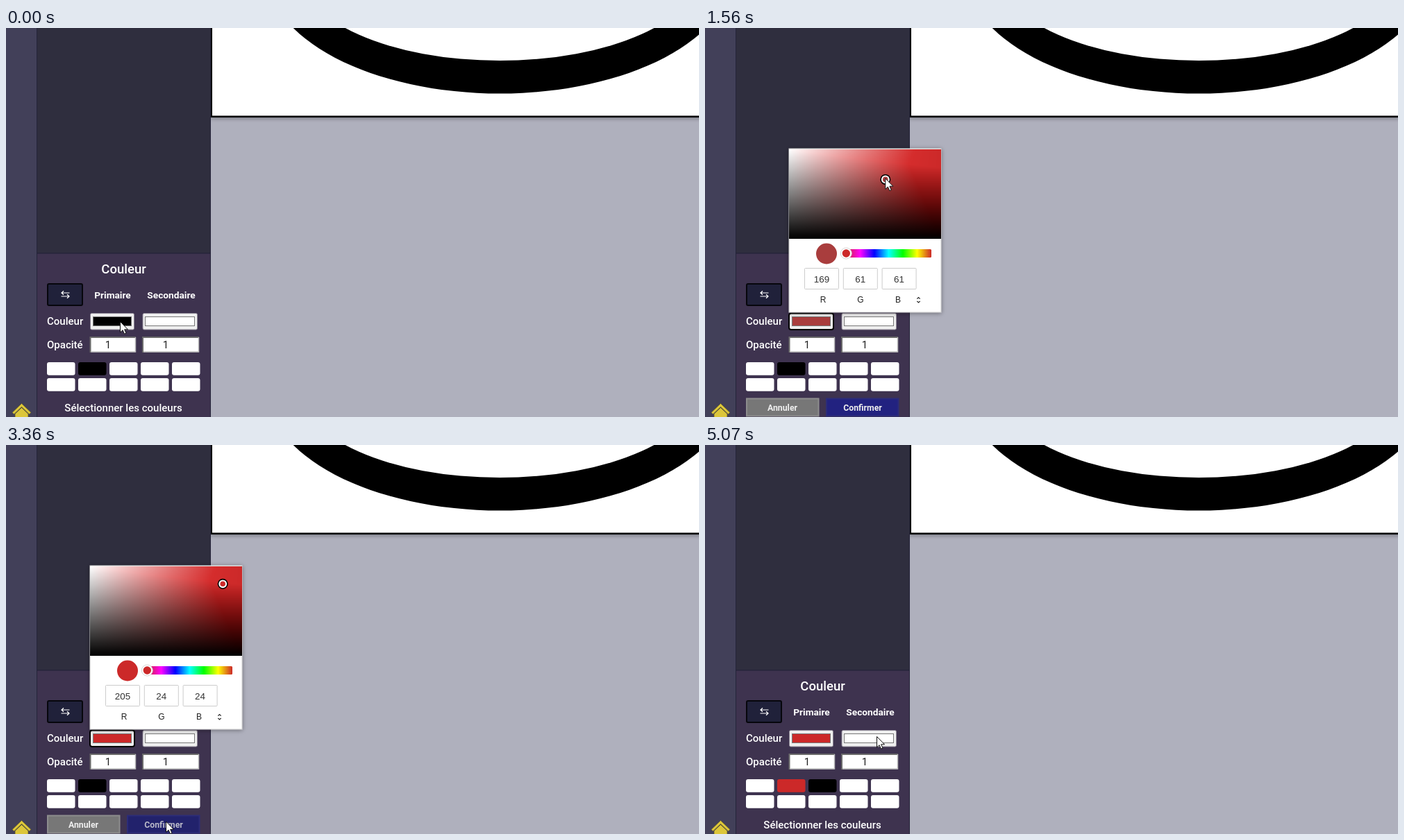
Recreate the animation shown at these times as an HTML page with a canvas. Size 998 by 561 pixels, loop 5.1 s.

```html
<!DOCTYPE html>
<html lang="fr">
<head>
<meta charset="utf-8">
<style>
html, body { margin: 0; width: 100%; height: 100%; overflow: hidden; background: #afb0bd; }
svg { display: block; width: 998px; height: 561px; }
text { font-family: Roboto, "Liberation Sans", sans-serif; font-weight: 500; fill: #fff; }
.mid { text-anchor: middle; }
.label { font-size: 15px; }
.head { font-size: 13.7px; font-weight: 700; }
.btn { font-size: 12.3px; font-weight: 700; fill: #eee; }
.num { font-size: 15px; font-weight: 400; fill: #222; }
.rgb { font: 13.4px "Liberation Sans", Arial, sans-serif; fill: #333; }
.rgb.small { font-size: 12px; fill: #222; }
.line { fill: none; stroke: #fff; stroke-width: 1.2; }
canvas { display: block; }
</style>
</head>
<body>
<svg viewBox="0 0 998 561">
  <defs>
    <linearGradient id="hue"></linearGradient>
    <clipPath id="popClip"><rect x="121" y="174" width="219" height="236"/></clipPath>
    <clipPath id="svClip"><rect x="121" y="175" width="219" height="129"/></clipPath>
    <filter id="shade" x="-20%" y="-20%" width="140%" height="140%">
      <feDropShadow dx="0" dy="1" stdDeviation="3" flood-opacity=".4"/>
    </filter>
  </defs>

  <!-- drawing area -->
  <rect width="998" height="561" fill="#afb0bd"/>
  <rect x="294" y="-20" width="740" height="149" fill="#000" filter="url(#shade)"/>
  <rect x="297" y="-20" width="710" height="146.5" fill="#fff"/>
  <ellipse cx="711" cy="-82.5" rx="336" ry="177"/>
  <ellipse cx="711" cy="-82.5" rx="288.5" ry="129.5" fill="#fff"/>

  <!-- side panels -->
  <rect width="45" height="561" fill="#424059"/>
  <rect x="44" width="251" height="561" fill="#25243a"/>
  <rect x="45" width="249" height="324" fill="#2f2e3e"/>
  <rect x="45" y="325.5" width="249" height="236" fill="#3e334f"/>
  <g fill="#dcc63a" stroke="#55502f" stroke-width=".7">
    <path d="M22.5 547.5 L32 556.5 V562 H13 V556.5 Z"/>
    <path d="M22.5 541.5 L36 554.5 L33.5 557 L22.5 546.5 L11.500 557 L9 554.5 Z"/>
  </g>

  <text class="mid" x="169.5" y="354" font-size="18.5">Couleur</text>
  <rect x="60" y="369" width="50" height="31" rx="2" fill="#20213a" stroke="#06060c" stroke-width="2"/>
  <path class="line" d="M91.500 382H80M83 379.300L80 382L83 384.700M79.500 387H91M88 384.300L91 387L88 389.700"/>
  <text class="head mid" x="153.500" y="389.500">Primaire</text>
  <text class="head mid" x="238" y="389.500">Secondaire</text>
  <text class="label" x="59" y="428">Couleur</text>
  <text class="label" x="59" y="462">Opacité</text>

  <g id="fields"></g>
  <rect id="focus" x="121" y="411.500" width="64" height="23.500" rx="3" fill="none" stroke="#050505" stroke-width="2"/>
  <rect id="primary" x="125.500" y="416.500" width="55" height="13" stroke="#777"/>
  <g id="palette"></g>

  <text id="hint" class="label mid" x="169" y="553">Sélectionner les couleurs</text>
  <g id="actions">
    <rect x="60" y="534.500" width="103.500" height="25" fill="#777" stroke="#8d8d8d" stroke-width="2"/>
    <text class="btn mid" x="111.500" y="551.500">Annuler</text>
    <rect id="okBox" x="175" y="534.500" width="103.500" height="25" stroke="#2c2c78" stroke-width="2"/>
    <text id="okText" class="btn mid" x="227" y="551.500">Confirmer</text>
  </g>

  <!-- colour picker -->
  <g id="popup">
    <rect x="121" y="174" width="219" height="236" fill="#fff" stroke="#c9c9c9" filter="url(#shade)"/>
    <g clip-path="url(#popClip)">
      <foreignObject x="121" y="175" width="219" height="129">
        <canvas id="shades" width="219" height="129"></canvas>
      </foreignObject>
      <g id="handle" clip-path="url(#svClip)">
        <g id="knob">
          <circle r="7.500" fill="#000"/>
          <circle r="5.900" fill="#fff"/>
          <circle id="dot" r="3.800"/>
        </g>
      </g>
      <circle id="sample" cx="175" cy="325.500" r="15"/>
      <rect x="203" y="319" width="123" height="12" rx="1.500" fill="url(#hue)"/>
      <circle cx="203.300" cy="325" r="8" fill="#fff" stroke="#ccc" stroke-width=".8"/>
      <circle cx="203.300" cy="325" r="5.700" fill="#cc2929"/>
      <rect id="row" x="143" y="381" width="188" height="23" rx="2" fill="#f4f4f4"/>
      <g id="channels"></g>
      <path d="M305.300 390.700L307.500 388.500L309.700 390.700M305.300 393.800L307.500 396L309.700 393.800" fill="none" stroke="#222" stroke-width="1.200"/>
    </g>
  </g>

  <path id="cursor" d="M0 0V15.500L3.600 12.200L6 17.700L8.500 16.600L6.100 11.300H11Z" fill="#fff" stroke="#111" stroke-width="1"/>
</svg>

<script>
const LOOP = 5100, OPEN = 180, PICK = 930, CLOSE = 3870, CONFIRM = 4230;
const RED = '#cc2929';
const $ = id => document.getElementById(id);
const show = (id, on) => $(id).setAttribute('visibility', on ? 'visible' : 'hidden');
const rect = (x, y, w, h, attrs) => `<rect x="${x}" y="${y}" width="${w}" height="${h}" ${attrs}/>`;

// Each key: time, x, y
const cursorKeys = [
  [510, 164.5, 423.5], [860, 180, 252], [930, 180, 250], [1080, 207.5, 235],
  [1560, 259.5, 217], [1700, 300, 204], [1800, 313, 200.5], [2280, 313, 201],
  [2730, 226, 402.5], [3240, 230.5, 543], [4380, 230.5, 543], [4900, 247.5, 420.5]
];
const knobKeys = [
  [930, 180, 250], [1080, 204.02, 241.77], [1560, 259.53, 218.51],
  [1700, 299, 204], [1800, 312.2, 200.29]
];

function at(keys, t) {
  const i = keys.findIndex(k => k[0] > t);
  if (i < 0) return keys[keys.length - 1].slice(1);
  if (!i) return keys[0].slice(1);
  const a = keys[i - 1], b = keys[i];
  const p = (t - a[0]) / (b[0] - a[0]);
  return [a[1] + (b[1] - a[1]) * p, a[2] + (b[2] - a[2]) * p];
}

function paintShades() {
  const ctx = $('shades').getContext('2d'), img = ctx.createImageData(219, 129);
  for (let y = 0, i = 0; y < 129; y++) for (let x = 0; x < 219; x++, i += 4) {
    const v = 255 * (1 - y / 128);
    let g = v * (1 - x / 218);
    const r = Math.min(v, 204 + g * .2);
    g = Math.max(g, 41 * (r / 204) ** 2);
    img.data.set([r, g, g, 255], i);
  }
  ctx.putImageData(img, 0, 0);
}

function build() {
  const hues = [RED, '#f0f', '#00f', '#0ff', '#0f0', '#ff0', RED];
  $('hue').innerHTML = hues.map((c, i) => `<stop offset="${i / 6}" stop-color="${c}"/>`).join('');

  const field = (x, w, tx) =>
    rect(x, 411.5, w - 2, 23.5, 'rx="2" fill="#efefef" stroke="#8c8694"') +
    rect(x, 445.5, w, 22, 'fill="#fff"') +
    `<path d="M${x} 468V446H${x + w}" fill="none" stroke="#6b6b6b" stroke-width="2"/>` +
    `<path d="M${x + 1} 467H${x + w}V446" fill="none" stroke="#b9b9b9" stroke-width="1.5"/>` +
    `<text class="num mid" x="${tx}" y="461.5">1</text>`;
  $('fields').innerHTML = field(121.5, 65, 147) + field(197, 80.5, 230) +
    rect(200.5, 416.5, 71, 13, 'fill="#fff" stroke="#777"');

  let cells = '';
  for (let i = 0; i < 10; i++)
    cells += rect(59 + i % 5 * 45, i < 5 ? 482 : 505, 40.5, 18.8, 'rx="3" fill="#fff"');
  $('palette').innerHTML = cells;

  $('channels').innerHTML = [...'RGB'].map((c, i) =>
    rect(143.5 + i * 55.8, 346.5, 49, 30, 'rx="1" fill="#fff" stroke="#ccc"') +
    `<text class="rgb mid value" x="${168 + i * 55.7}" y="366.5"></text>` +
    `<text class="rgb small mid" x="${170 + i * 54}" y="396">${c}</text>`).join('');
}

function colourAt(x, y) {
  const s = (x - 121.5) / 216, v = 255 * (1 - (y - 175) / 129);
  const g = Math.round(v * (1 - s));
  return [Math.round(v), g, g];
}

function draw() {
  const t = performance.now() % LOOP;
  const [cx, cy] = at(cursorKeys, t);
  const picked = t >= PICK, done = t >= CONFIRM;
  const [kx, ky] = picked ? at(knobKeys, t) : [121, 301];
  const rgb = picked ? colourAt(kx, ky) : [0, 0, 0];
  const colour = rgb[0] > 200 ? RED : `rgb(${rgb})`;
  const open = t >= OPEN && t < CLOSE;
  const editing = picked && !done;
  const over = cy > 534;

  $('cursor').setAttribute('transform', `translate(${cx} ${cy})`);
  $('knob').setAttribute('transform', `translate(${kx} ${ky})`);
  for (const id of ['primary', 'sample', 'dot']) $(id).setAttribute('fill', colour);
  document.querySelectorAll('.value').forEach((n, i) => n.textContent = rgb[i]);

  show('popup', open);
  show('focus', open);
  show('row', cy > 381 && cy < 404 && cx > 171);
  show('actions', editing);
  show('hint', !editing);
  $('okBox').setAttribute('fill', over ? '#22226c' : '#222280');
  $('okText').style.fill = over ? '#b9b9c8' : '#eee';

  const cells = $('palette').children;
  cells[1].setAttribute('fill', done ? RED : '#000');
  cells[2].setAttribute('fill', done ? '#000' : '#fff');
  requestAnimationFrame(draw);
}

build();
paintShades();
draw();
</script>
</body>
</html>
```
